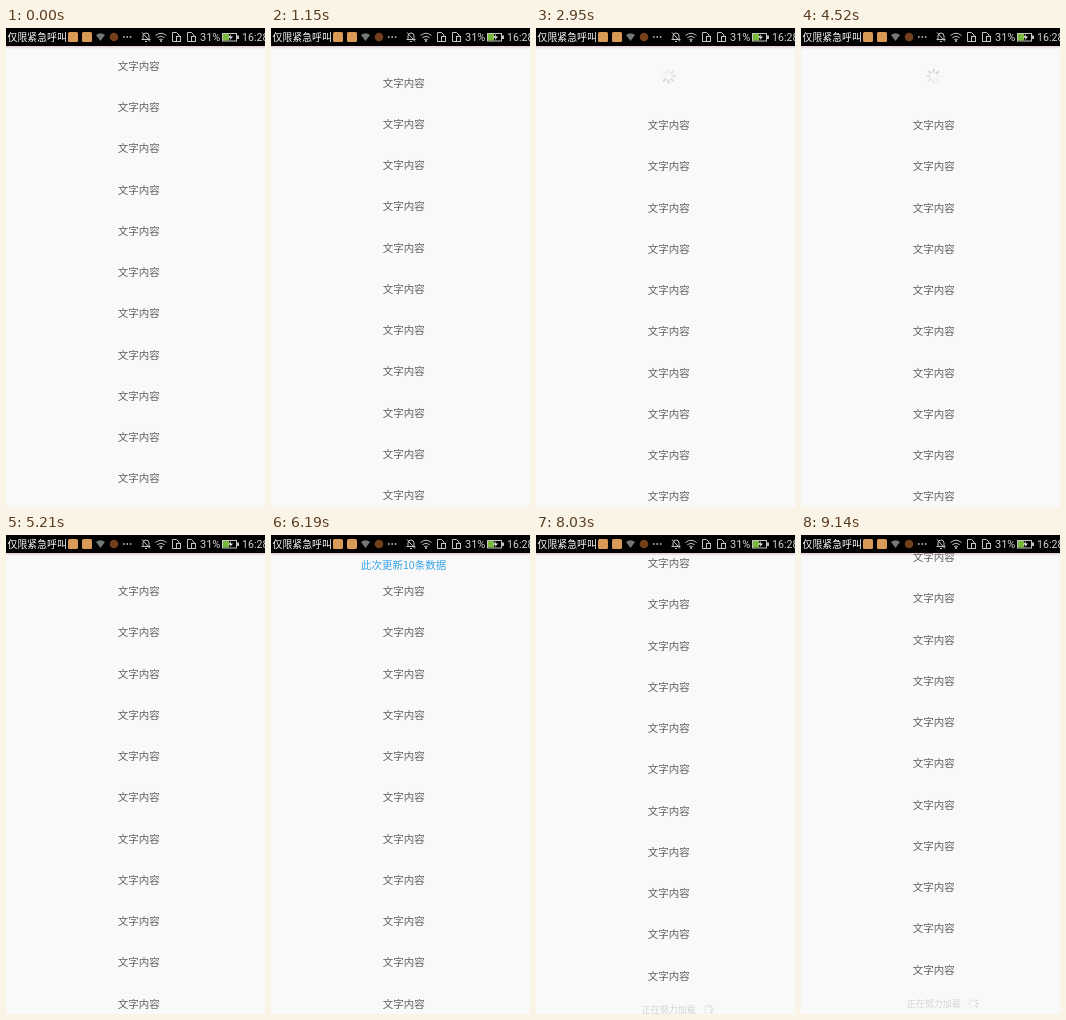
Write an HTML page that moves like this. It is 259 px wide and 479 px high and loops after 9280 ms.

```html
<!DOCTYPE html>
<html lang="zh">
<head>
<meta charset="utf-8">
<title>Pull to refresh</title>
<style>
  html, body { margin: 0; width: 100%; height: 100%; overflow: hidden; background: #f9f9f9; }
  svg { display: block; width: 100vw; height: 100vh; }
  text { font-family: "Noto Sans CJK SC", "Noto Sans CJK", "Noto Sans", sans-serif; }
  .row, #message { font-size: 10.5px; text-anchor: middle; }
  .row { fill: #606060; }
  #message { fill: #35a2e6; }
  #footer text { font-size: 9px; fill: #d4d4d4; }
  .status text { fill: #fff; font-size: 9.9px; }
  .status .latin { font-family: Roboto, sans-serif; font-size: 11px; fill: #d2d2d2; }
  .line { fill: none; stroke: #c4c4c4; stroke-width: 1; }
</style>
</head>
<body>
<svg viewBox="0 0 259 479">
  <defs>
    <linearGradient id="shadow" x2="0" y2="1">
      <stop offset="0" stop-color="#b58fa8" stop-opacity=".42"/>
      <stop offset="1" stop-color="#b58fa8" stop-opacity="0"/>
    </linearGradient>
  </defs>
  <rect width="259" height="479" fill="#f9f9f9"/>
  <g id="rows"></g>
  <g id="header"></g>
  <text id="message" x="132.6">此次更新10条数据</text>
  <g id="footer"><text x="105.7" y="3.4">正在努力加载</text><g id="more"></g></g>

  <g class="status">
    <rect y="18" width="259" height="3" fill="url(#shadow)"/>
    <rect width="259" height="18" fill="#000"/>
    <text x="1.6" y="12.8">仅限紧急呼叫</text>
    <rect x="62" y="4" width="10" height="10" rx="1.5" fill="#d99a55"/>
    <rect x="76" y="4" width="10" height="10" rx="1.5" fill="#d99a55"/>
    <path d="M90 7 Q94.5 3.5 99 7 L94.5 13Z" fill="#737979"/>
    <circle cx="108" cy="9" r="4.3" fill="#74401c"/>
    <path d="M117 9h1.6M120.4 9h1.6M123.8 9h1.6" stroke="#c8c8c8" stroke-width="1.6"/>
    <path class="line" d="M137 11.5V8a3 3 0 0 1 6 0v3.5M135.5 11.5h9M139 13.5h2M136 4.5l8 9"/>
    <path class="line" d="M149.5 7.5q5.5-4.5 11 0M151.3 9.7q3.7-3 7.4 0M153.2 11.7q1.8-1.4 3.6 0"/>
    <circle cx="155" cy="13" r="1" fill="#c4c4c4"/>
    <g id="sim"><path class="line" d="M170 13.5h-3.5v-9h4l2.5 2.5v1"/><rect class="line" x="170.5" y="8.5" width="4" height="5"/></g>
    <use href="#sim" x="15"/>
    <text class="latin" x="194" y="13">31%</text>
    <rect class="line" x="216.5" y="5.5" width="14" height="7.5"/>
    <rect x="217" y="6" width="6" height="6.5" fill="#78b93c"/>
    <path d="M231 7.5h2v3.5h-2z" fill="#c4c4c4"/>
    <path d="M225 6l-3 3.7h2.5l-1 2.8 3.5-4h-2.5z" fill="#eee"/>
    <text class="latin" x="236" y="13" style="font-size:10.6px">16:28</text>
  </g>
</svg>
<script>
const LOOP = 9280, ROWS = 11, PITCH = 41.25, PETALS = 8;
// Bursts of screen updates: start, end, number of updates
const BURSTS = [
  [1150, 2110, 8], [2230, 3220, 8], [3340, 4250, 8], [4390, 5210, 7],
  [5500, 6190, 6], [6750, 7020, 3], [7730, 8730, 8], [8870, 9140, 3]
];
const $ = id => document.getElementById(id);

function add(parent, name, attrs) {
  const el = document.createElementNS("http://www.w3.org/2000/svg", name);
  for (const key in attrs) el.setAttribute(key, attrs[key]);
  return parent.appendChild(el);
}

function makeSpinner(group, radius) {
  for (let i = 0; i < PETALS; i++) {
    const shade = 213 + 4 * i;
    add(group, "line", {
      y1: -radius * 0.55, y2: -radius * 0.88,
      stroke: `rgb(${shade},${shade},${shade})`,
      "stroke-width": radius * 0.26, "stroke-linecap": "round",
      transform: `rotate(${-i * 360 / PETALS})`
    });
  }
}

const rows = Array.from({ length: ROWS }, () => {
  const row = add($("rows"), "text", { class: "row", x: 132.7 });
  row.textContent = "文字内容";
  return row;
});
makeSpinner($("header"), 7.5);
makeSpinner($("more"), 5.5);

const easeIn = p => p * p;
const easeOut = p => 1 - (1 - p) ** 2;

function tween(t, start, end, from, to, ease = p => p) {
  const p = Math.min(1, Math.max(0, (t - start) / (end - start)));
  return from + (to - from) * ease(p);
}

// Hold the picture between updates
function snap(t) {
  let held = 0;
  for (const [start, end, count] of BURSTS) {
    if (t < start) break;
    const gap = (end - start) / (count - 1);
    held = start + gap * Math.min(count - 1, Math.floor((t - start + 15) / gap));
  }
  return held;
}

function listTop(t) {
  if (t < 1150) return 37.8;
  if (t < 2200) return tween(t, 1150, 2110, 54.5, 119, easeOut);
  if (t < 4600) return tween(t, 2110, 2510, 119, 97, easeOut);
  if (t < 6700) return tween(t, 4663, 5210, 97, 56, easeOut);
  if (t < 7700) return tween(t, 6615, 7020, 56, 37.4, easeIn);
  return tween(t, 7590, 8730, 37.4, 22, easeOut);
}

function show(el, visible) {
  el.setAttribute("visibility", visible ? "visible" : "hidden");
}

function place(el, x, y, angle = 0) {
  el.setAttribute("transform", `translate(${x} ${y}) rotate(${angle})`);
}

function render(time) {
  const t = snap(time % LOOP);
  const top = listTop(t);
  const angle = Math.round(t / 137) * 360 / PETALS;

  rows.forEach((row, i) => row.setAttribute("y", Math.round(top + i * PITCH) + 4));

  show($("header"), t >= 1150 && t < 4700);
  place($("header"), 132.5, top - 48.8, angle);

  show($("message"), t >= 5500 && t < 7000);
  $("message").setAttribute("y", 34 - Math.max(0, 56 - top) / 2);
  $("message").setAttribute("opacity", tween(t, 5360, 6190, 0, 1));

  show($("footer"), t >= 7730);
  place($("footer"), 0, Math.round(top + 447));
  place($("more"), 172.5, -0.5, angle);
}

const began = performance.now();
function tick() {
  render(performance.now() - began);
  requestAnimationFrame(tick);
}
tick();
</script>
</body>
</html>
```
